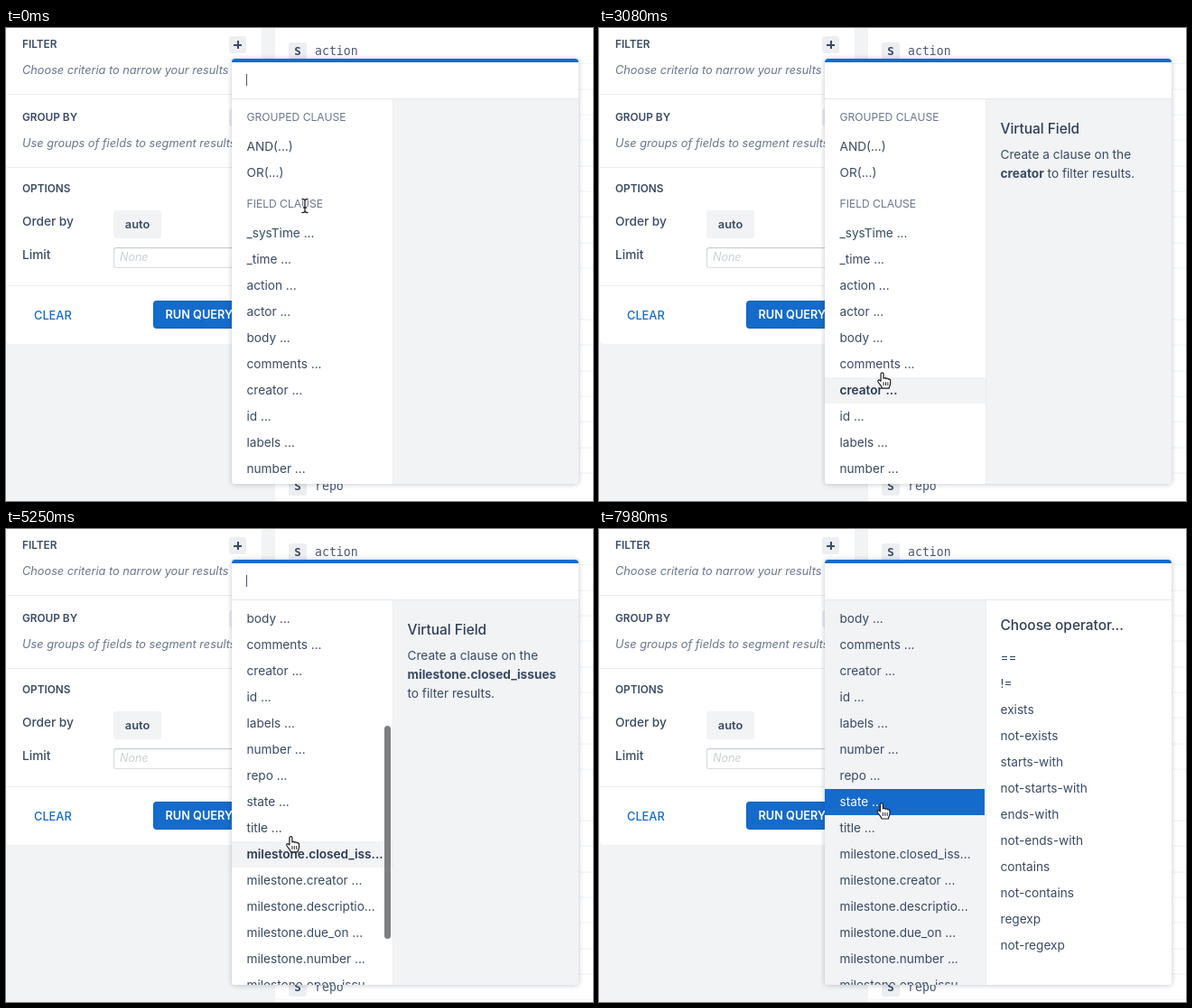
These frames come from a looping animation (650x524 px, 8000 ms). An HTML page:

```html
<!DOCTYPE html>
<html lang="en">
<head>
<meta charset="utf-8">
<title>Query filter menu</title>
<style>
  :root { --ink: #394a64; --soft: #68778c; --blue: #146bcb; --grey: #f1f3f5; --line: #eaedf0; }
  html, body { margin: 0; width: 100%; height: 100%; overflow: hidden; }
  body { background: var(--grey); }
  #stage { position: relative; width: 650px; height: 524px; overflow: hidden; color: var(--ink);
    font: 13.65px/20px Inter, sans-serif; white-space: nowrap; cursor: default; }
  #stage div, #stage svg { position: absolute; box-sizing: border-box; }
  .head { left: 18px; font-size: 11.8px; font-weight: 600; }
  .hint { left: 18px; font-size: 12.75px; font-style: italic; color: var(--soft); }
  .label { left: 18px; font-weight: 500; }
  .card { left: 1px; top: -10px; width: 282px; height: 360px; background: #fff; border-radius: 4px; }
  .rule { left: 1px; width: 282px; height: 1px; background: var(--line); }
  .plus { left: 247px; width: 19px; height: 19px; border-radius: 3px; background: #eceef1; }
  .plus::before, .plus::after { content: ""; position: absolute; background: var(--ink); }
  .plus::before { left: 5px; top: 8.5px; width: 9px; height: 2px; }
  .plus::after { left: 8.5px; top: 5px; width: 2px; height: 9px; }
  .button { border-radius: 3px; line-height: 31px; height: 31px; }
  .auto { left: 119px; top: 202px; width: 53px; background: var(--grey); text-align: center;
    font-size: 12.8px; font-weight: 600; }
  .clear { left: 31px; top: 302.5px; color: var(--blue); font-size: 12.8px; font-weight: 500; }
  .run { left: 163px; top: 302px; width: 104px; padding-left: 13.5px; border-radius: 4px;
    background: var(--blue); color: #fff; font-size: 12.75px; font-weight: 600;
    box-shadow: inset 0 0 0 1px rgba(16, 22, 26, .12); }
  .limit { left: 119px; top: 243px; width: 148px; height: 23px; border-radius: 3px; line-height: 22px;
    padding-left: 7px; font-size: 12.5px; font-style: italic; color: #c9cfd7;
    box-shadow: inset 0 0 0 1px rgba(40, 55, 80, .16), inset 0 1px 2px rgba(40, 55, 80, .16); }
  .table { left: 298px; top: 0; width: 352px; height: 524px;
    background: repeating-linear-gradient(#fff 0 27.35px, #f0f2f4 27.35px 28.35px) 0 11.6px; }
  .badge { left: 313px; width: 20px; height: 20px; border-radius: 3px; background: #eceef1; text-align: center;
    font: bold 12.5px/20px "DejaVu Sans Mono", monospace; }
  .field { left: 342px; font: 13.2px/20px "DejaVu Sans Mono", monospace; color: #4b5a72; }
  #menu { left: 250px; top: 34px; width: 384px; height: 471px; background: #fff; border-radius: 4px;
    box-shadow: 0 0 4px 1px rgba(40, 55, 80, .13), 0 1px 7px rgba(40, 55, 80, .11); overflow: hidden; }
  .bar { left: 0; top: 0; width: 100%; height: 3.5px; background: var(--blue); }
  #caret { left: 15.5px; top: 17px; width: 1px; height: 13px; background: #4a566a; }
  #list { left: 0; top: 44px; width: 178px; height: 427px; overflow: hidden; background: #fff; }
  #pane { left: 178px; top: 44px; width: 206px; height: 427px; background: var(--grey); }
  .edge { left: 0; top: 43.5px; width: 384px; height: 1px; background: #e6e9ed; }
  .side { left: 177.5px; top: 44px; width: 1px; height: 427px; background: #ebeef1; }
  #rows { left: 0; top: 0; width: 178px; }
  .group { left: 16.5px; font-size: 12.1px; color: var(--soft); }
  .row { left: 0; width: 178px; height: 29px; padding-left: 16.5px; line-height: 29px; }
  .row.hover { background: var(--grey); font-weight: 600; color: #2b3a52; }
  .row.picked { background: var(--blue); color: #fff; width: 177px; }
  #thumb { left: 168.5px; top: 2px; width: 7px; height: 236px; border-radius: 4px; background: #7e7f81; }
  .title { left: 16.5px; font-size: 15.4px; font-weight: 500; color: #2f3e56; }
  #about p { position: absolute; left: 16.5px; top: 52px; margin: 0; width: 180px; line-height: 21px;
    white-space: normal; }
  #about b { font-weight: 700; }
  .op { left: 16.5px; }
  #ring { left: 293px; top: 283px; width: 42px; height: 42px; border: 3px solid rgba(120, 128, 140, .5);
    border-radius: 50%; }
  #stage svg { left: 0; top: 0; overflow: visible; }
</style>
</head>
<body>
<div id="stage">
  <div class="table"></div>
  <div class="badge" style="top:16px">S</div><div class="field" style="top:15.5px">action</div>
  <div class="badge" style="top:498px">S</div><div class="field" style="top:497.5px">repo</div>

  <div class="card"></div>
  <div class="rule" style="top:73px"></div>
  <div class="rule" style="top:154px"></div>
  <div class="rule" style="top:285px"></div>
  <div class="head" style="top:8px">FILTER</div>
  <div class="hint" style="top:37px">Choose criteria to narrow your results</div>
  <div class="plus" style="top:9px"></div>
  <div class="head" style="top:89px">GROUP BY</div>
  <div class="hint" style="top:118px">Use groups of fields to segment results</div>
  <div class="plus" style="top:90px"></div>
  <div class="head" style="top:168px">OPTIONS</div>
  <div class="label" style="top:204px">Order by</div>
  <div class="button auto">auto</div>
  <div class="label" style="top:241px">Limit</div>
  <div class="limit">None</div>
  <div class="button clear">CLEAR</div>
  <div class="button run">RUN QUERY</div>

  <div id="menu">
    <div class="bar"></div>
    <div id="caret"></div>
    <div id="list">
      <div id="rows">
        <div class="group" style="top:11px">GROUPED CLAUSE</div>
        <div class="row" style="top:39px">AND(...)</div>
        <div class="row" style="top:68px">OR(...)</div>
        <div class="group" style="top:107px">FIELD CLAUSE</div>
      </div>
      <div id="thumb"></div>
    </div>
    <div id="pane">
      <div id="about">
        <div class="title" style="top:24px">Virtual Field</div>
        <p>Create a clause on the <b id="name"></b> to filter results.</p>
      </div>
      <div id="operators"><div class="title" style="top:19px">Choose operator...</div></div>
    </div>
    <div class="edge"></div>
    <div class="side"></div>
  </div>

  <div id="ring"></div>
  <svg width="1" height="1" fill="none" stroke-linecap="round" stroke-linejoin="round">
    <defs><path id="bar" d="M-3-7.5Q0-7.5 0-5.5Q0-7.5 3-7.5M0-5.5V5.5M-3 7.5Q0 7.5 0 5.5Q0 7.5 3 7.5M-1.5 2H1.5"/></defs>
    <g id="beam">
      <use href="#bar" stroke="#fff" stroke-width="3"/>
      <use href="#bar" stroke="#222" stroke-width="1.3"/>
    </g>
    <g id="hand" stroke="#1c1c1c" stroke-width="1.2">
      <path fill="#fff" d="M-1.6 9V1.2a1.5 1.5 0 0 1 3 0V6c.6-1 2.6-.8 2.8.4c.6-.7 2.4-.5 2.6.6c.7-.5 2.2-.1 2.2 1.2V11.5C9 14 7.5 14.5 7.5 17H0C-.5 14.5-3 12.5-4.6 9.8C-5.5 8.2-3.8 7.2-2.8 8Z"/>
      <path stroke-width="1" d="M1.4 10.5V13.5M3.8 10.5V13.5M6.2 10.5V13.5"/>
    </g>
  </svg>
</div>
<script>
  const LOOP = 8000, STEP = 70, ROW = 29, FIRST_ROW = 213, LIST_TOP = 78;
  const LAG = 100, SCROLL_START = 3380, SCROLL_END = 4300, SCROLL = 244, CLICK = 5880;
  const $ = id => document.getElementById(id);
  const clamp = v => Math.min(1, Math.max(0, v));
  const show = (el, on) => { el.style.visibility = on ? 'visible' : 'hidden'; };

  // A bar marks where a long label is cut off in the list.
  const fields = ['_sysTime', '_time', 'action', 'actor', 'body', 'comments', 'creator', 'id', 'labels',
    'number', 'repo', 'state', 'title', 'milestone.closed_iss|ues', 'milestone.creator',
    'milestone.descriptio|n', 'milestone.due_on', 'milestone.number', 'milestone.open_issu|es'];
  const operators = ['==', '!=', 'exists', 'not-exists', 'starts-with', 'not-starts-with', 'ends-with',
    'not-ends-with', 'contains', 'not-contains', 'regexp', 'not-regexp'];

  function add(parent, cls, top, text) {
    const el = document.createElement('div');
    el.className = cls;
    el.style.top = top + 'px';
    el.textContent = text;
    return parent.appendChild(el);
  }
  const rows = fields.map((f, i) => {
    const [label, cut] = f.split('|');
    return add($('rows'), 'row', FIRST_ROW - LIST_TOP + i * ROW, label + (cut ? '...' : ' ...'));
  });
  operators.forEach((op, i) => add($('operators'), 'op', 54 + i * ROW, op));

  // Pointer stops: time, x, y
  const path = [[0, 331, 197], [500, 331, 197], [1200, 324, 294], [1450, 324, 294], [2400, 309, 409],
    [2780, 309, 409], [3320, 317, 363], [5030, 317, 363], [5560, 313, 304], [LOOP, 313, 304]];

  function pointer(t) {
    const i = Math.max(1, path.findIndex(p => p[0] >= t));
    const [t0, x0, y0] = path[i - 1], [t1, x1, y1] = path[i];
    const p = clamp((t - t0) / (t1 - t0)), e = p * p * (3 - 2 * p);
    return { x: x0 + (x1 - x0) * e, y: y0 + (y1 - y0) * e };
  }

  const scrollAt = t => SCROLL * (1 - (1 - clamp((t - SCROLL_START) / (SCROLL_END - SCROLL_START))) ** 3.5);

  // The highlight trails the pointer and stays put while the list scrolls.
  function hoverAt(t) {
    const frozen = t >= SCROLL_START && t < SCROLL_END;
    const y = pointer((frozen ? SCROLL_START : t) - LAG).y + (frozen ? 0 : scrollAt(t));
    return Math.floor((y - FIRST_ROW) / ROW);
  }

  function render(t) {
    const at = pointer(t), scroll = scrollAt(t), hover = hoverAt(t), clicked = t >= CLICK;
    const overRow = at.y >= FIRST_ROW;
    for (const id of ['beam', 'hand']) $(id).setAttribute('transform', `translate(${at.x} ${at.y})`);
    show($('beam'), !overRow);
    show($('hand'), overRow);

    rows.forEach((row, i) => {
      row.className = 'row' + (i !== hover ? '' : clicked ? ' picked' : ' hover');
    });
    $('rows').style.top = -scroll + 'px';
    $('thumb').style.top = 2 + scroll * .565 + 'px';
    $('thumb').style.opacity = clicked ? 0 : clamp((t - SCROLL_START) / 70) * clamp((5750 - t) / 250);

    $('name').textContent = hover >= 0 ? fields[hover].replace('|', '') : '';
    show($('about'), hover >= 0 && !clicked);
    show($('operators'), clicked);
    $('list').style.background = clicked ? 'var(--grey)' : '#fff';
    $('pane').style.background = clicked ? '#fff' : 'var(--grey)';

    show($('caret'), !clicked && (t + 70) % 1060 < 530);
    const age = t - CLICK;
    $('ring').style.opacity = age < 0 ? 0 : clamp((520 - age) / 260);
    $('ring').style.transform = `scale(${.6 + .4 * clamp(age / 140)})`;
  }

  function tick() {
    const t = performance.now() % LOOP;
    render(Math.floor(t / STEP) * STEP);
    requestAnimationFrame(tick);
  }
  tick();
</script>
</body>
</html>
```
